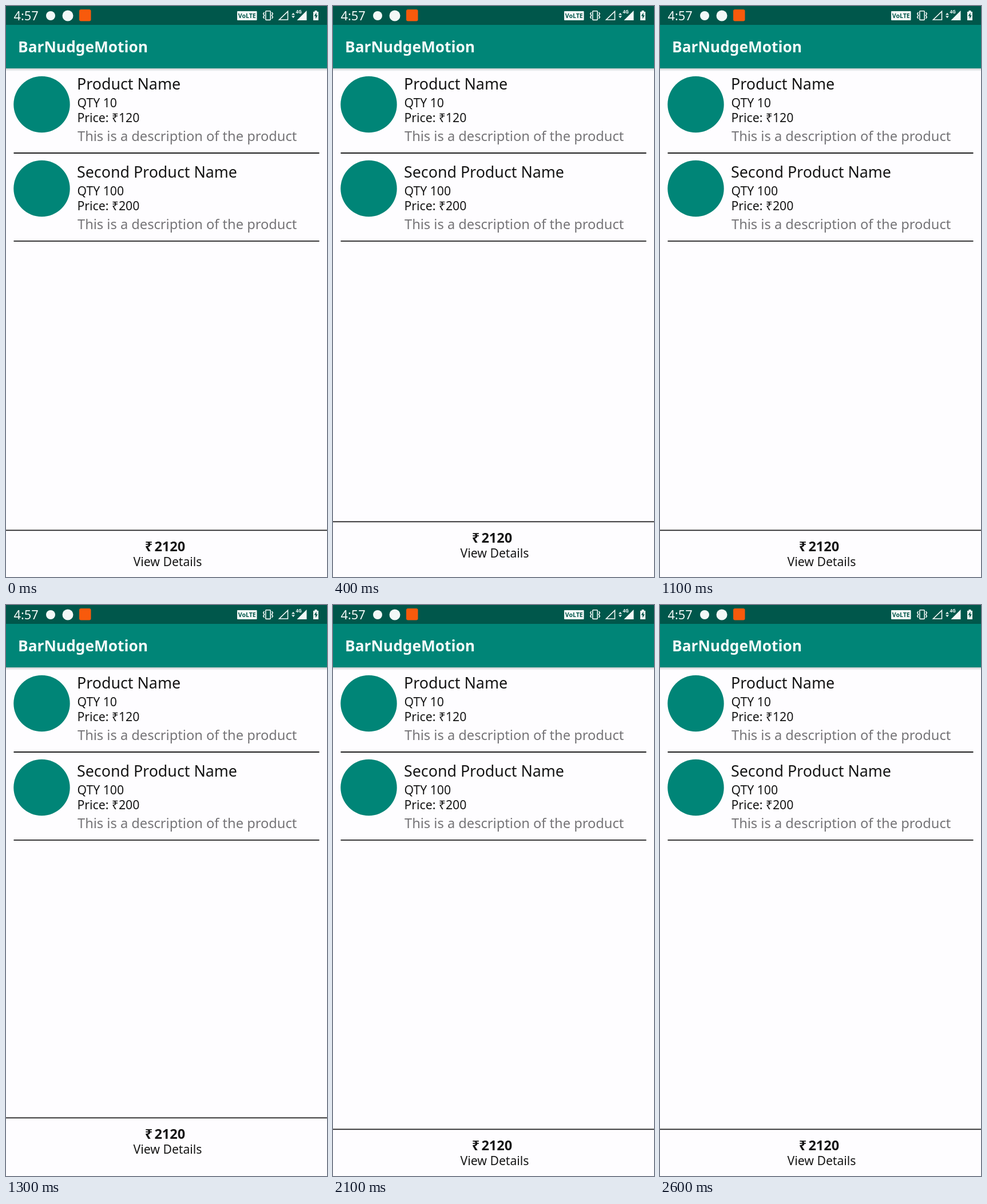
An HTML page for the animation above (3.2 s loop, 561 px wide and 998 px high).

```html
<!DOCTYPE html>
<html lang="en">
<head>
<meta charset="utf-8">
<title>Cart bar hop</title>
<style>
  html, body { margin: 0; width: 100%; height: 100%; overflow: hidden; background: #fefdff; }
  svg { display: block; width: 561px; height: 998px; font-family: "Noto Sans", "Open Sans", sans-serif; }
  .title { font-size: 26.3px; font-weight: 700; fill: #f4fbfa; }
  .name { font-size: 26.8px; }
  .small { font-size: 21.2px; }
  .about { font-size: 23.65px; fill: #757477; }
  .total { font-size: 23.5px; font-weight: 700; word-spacing: -3px; }
  .rule { stroke: #1c1c1c; stroke-width: 1.8; }
  .bar { animation: hop 3.2s step-end infinite; }

  /* Three hops per loop, one second apart, in 100 ms steps */
  @keyframes hop {
    0%, 18.75%, 50%, 81.25%, 100% { transform: translateY(0); }
    6.25%, 37.5%, 68.75% { transform: translateY(-10.5px); }
    9.375%, 40.625%, 71.875% { transform: translateY(-20px); }
    12.5%, 43.75%, 75% { transform: translateY(-15px); }
    15.625%, 46.875%, 78.125% { transform: translateY(-3px); }
  }
</style>
</head>
<body>
<svg viewBox="0 0 561 998" fill="#151515">
  <defs>
    <linearGradient id="shade" x2="0" y2="1">
      <stop stop-color="#c9cccd"/>
      <stop offset="1" stop-color="#fefdff"/>
    </linearGradient>
  </defs>
  <rect width="561" height="998" fill="#fefdff"/>

  <!-- App bar -->
  <rect y="109" width="561" height="5" fill="url(#shade)"/>
  <rect y="33" width="561" height="76" fill="#008577"/>
  <text class="title" x="21" y="81">BarNudgeMotion</text>

  <!-- Status bar -->
  <rect width="561" height="33" fill="#00574b"/>
  <g fill="#f3f8f7">
    <text x="13.5" y="25" font-size="21.8">4:57</text>
    <circle cx="78" cy="17" r="8"/>
    <circle cx="108" cy="17" r="9.5"/>
    <rect x="128" y="6" width="20.5" height="20.5" rx="3" fill="#f85a0c"/>
    <rect x="404" y="9" width="34.5" height="16" rx="1"/>
    <text x="421.2" y="21" font-size="10.5" font-weight="800" text-anchor="middle" fill="#00574b">VoLTE</text>
    <g fill="none" stroke="#f3f8f7" stroke-width="1.6">
      <rect x="453.8" y="8.8" width="8.4" height="15.6" rx="1"/>
      <path d="M451.5 11l-1.8 2.5 1.8 3-1.8 3 1.8 2.5M464.5 11l1.8 2.5-1.8 3 1.8 3-1.8 2.5"/>
      <path d="M477.5 24H492.5V9.5Z"/>
    </g>
    <path d="M499 15.5l3-3.5 3 3.5ZM499 17.5h6l-3 3.5Z"/>
    <path d="M508.5 25H525.5V8L519 14.5Z"/>
    <text x="506.5" y="13" font-size="8" font-weight="700">4G</text>
    <path d="M537 10h2.5V8h4v2h2.5v15h-9Z"/>
    <path d="M542.5 11.5l-4 6h2.5v5l3.8-6.3h-2.3Z" fill="#00574b"/>
  </g>

  <!-- Products -->
  <g fill="#008577">
    <circle cx="62.5" cy="172" r="49.2"/>
    <circle cx="62.5" cy="319" r="49.2"/>
  </g>
  <g>
    <text class="name" x="124" y="146">Product Name</text>
    <text class="small" x="124.5" y="177">QTY 10</text>
    <text class="small" x="124.5" y="203">Price: ₹120</text>
    <text class="about" x="125" y="235.5">This is a description of the product</text>
    <path class="rule" d="M13.5 257H547.5"/>
  </g>
  <g transform="translate(0 154)">
    <text class="name" x="124" y="146">Second Product Name</text>
    <text class="small" x="124.5" y="177">QTY 100</text>
    <text class="small" x="124.5" y="203">Price: ₹200</text>
    <text class="about" x="125" y="235.5">This is a description of the product</text>
    <path class="rule" d="M13.5 256.8H547.5"/>
  </g>

  <!-- Cart bar -->
  <g class="bar" text-anchor="middle">
    <path class="rule" d="M0 916.4H561"/>
    <text class="total" x="278" y="953">₹ 2120</text>
    <text class="small" x="282.5" y="978.5">View Details</text>
  </g>
</svg>
</body>
</html>
```
